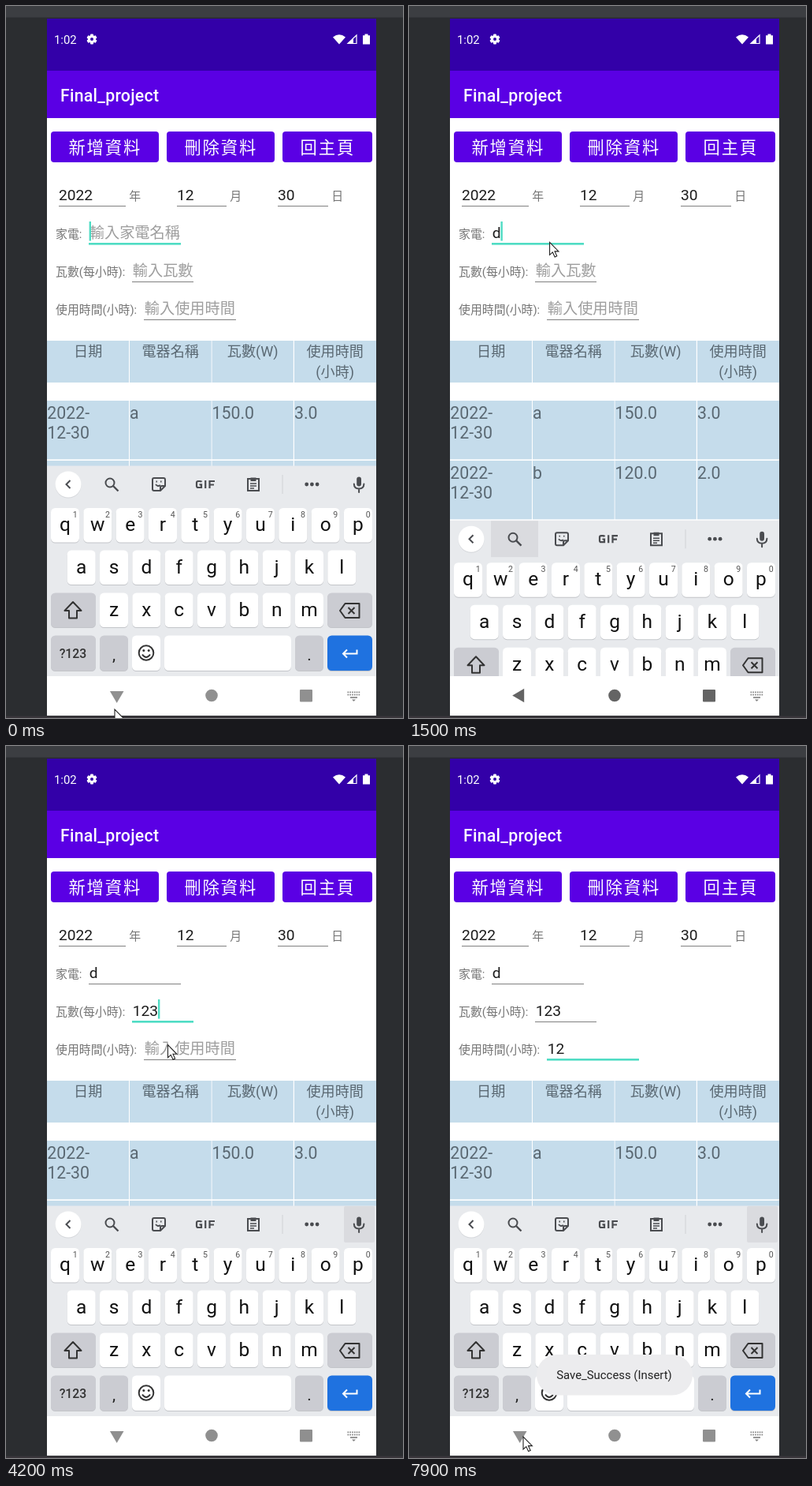
Animation of 504 by 902 pixels, one loop 8000 ms. Source, as an HTML page:

```html
<!DOCTYPE html>
<html lang="zh-Hant">
<head>
<meta charset="utf-8">
<style>
  html, body { margin: 0; width: 100%; height: 100%; overflow: hidden; background: #2b2d30; }
  svg { display: block; width: 504px; height: 902px; }
  text { font-family: Roboto, "Noto Sans CJK TC", "Noto Sans CJK JP", "Noto Sans CJK", sans-serif; white-space: pre; }
</style>
</head>
<body>
<svg id="stage" viewBox="0 0 504 902" xmlns="http://www.w3.org/2000/svg"></svg>
<script>
const LOOP = 8000, STEP = 100;
const PURPLE = '#5a00e4', CELL = '#c5dceb', MUTED = '#5a6872', TEAL = '#4fdcc4', ICON = '#4a4c50';

const rect = (x, y, w, h, fill, extra = '') =>
  `<rect x="${x}" y="${y}" width="${w}" height="${h}" fill="${fill}" ${extra}/>`;
const text = (x, y, size, fill, str, extra = '') =>
  `<text x="${x}" y="${y}" font-size="${size}" fill="${fill}" ${extra}>${str}</text>`;
const line = (d, color, width = 2, extra = '') =>
  `<path d="${d}" fill="none" stroke="${color}" stroke-width="${width}" ${extra}/>`;
const shape = (d, fill, extra = '') => `<path d="${d}" fill="${fill}" ${extra}/>`;
const circle = (x, y, r, fill, extra = '') => `<circle cx="${x}" cy="${y}" r="${r}" fill="${fill}" ${extra}/>`;
const MID = 'text-anchor="middle"';

function header() {
  const teeth = [0, 60, 120].map(a => rect(107, 35.5, 4, 13, '#fff', `rx="1" transform="rotate(${a} 109 42)"`)).join('');
  return rect(52, 16, 418, 66, '#3300a8') + rect(52, 82, 418, 60, PURPLE) +
    text(61, 48, 14.9, '#fff', '1:02') +
    teeth + circle(109, 42, 3.6, 'none', 'stroke="#fff" stroke-width="3"') + circle(109, 42, 2, '#3300a8') +
    shape('M415 39.5Q423 33 431 39.5L423 48.5Z', '#fff') +
    line('M445 37V47.5H434Z', '#fff', 1.2) + shape('M441 41.5V48H433.5Z', '#fff') +
    shape('M453 37.2h2.5v-1.7h4v1.7h2.5V48.5h-9Z', '#fff') +
    text(69, 121, 21.3, '#fff', 'Final_project', 'font-weight="500" letter-spacing=".27"');
}

function buttons() {
  const list = [[57, 137, '新增資料'], [204, 137, '刪除資料'], [351, 114, '回主頁']];
  return list.map(([x, w, label], i) =>
    rect(x, 159, w, 39, PURPLE, `rx="4" id="button${i}"`) +
    text(x + w / 2 - label.length * 11.6 + .3, 187, 21.3, '#fff', label, 'letter-spacing="1.9"')).join('');
}

const fields = [
  { x: 105, w: 117, y: 301, label: '家電:', hint: '輸入家電名稱', typed: [[1500, 'd']] },
  { x: 160, w: 78, y: 349, label: '瓦數(每小時):', hint: '輸入瓦數', typed: [[3500, '1'], [3700, '12'], [3900, '123']] },
  { x: 175, w: 117, y: 397, label: '使用時間(小時):', hint: '輸入使用時間', typed: [[4800, '1'], [5100, '12']] }
];

function form() {
  const dates = [[67, 85, '2022', '年'], [217, 63, '12', '月'], [345, 64, '30', '日']];
  return dates.map(([x, w, value, unit]) =>
    text(x, 246, 19.2, '#1c1c1c', value) + rect(x, 253, w, 1, '#808080') +
    text(x + w + 4.3, 246, 14.9, '#757575', unit)).join('') +
    fields.map((f, i) => text(63, f.y - 7.4, 14.9, '#757575', f.label) +
      text(f.x + .8, f.y - 7.2, 19.2, '#9e9e9e', f.hint, `id="value${i}"`) +
      rect(f.x, f.y, f.w, 1, '#808080', `id="underline${i}"`)).join('') +
    rect(0, 0, 2.4, 24.5, TEAL, 'id="caret"');
}

function table() {
  const columns = [52, 157, 261.5, 366];
  const cells = (y, h) => columns.map(x => rect(x, y, x === 157 ? 103.7 : 104 - (x === 261.5 ? .7 : 0), h, CELL)).join('');
  const titles = ['日期', '電器名稱', '瓦數(W)', '使用時間'];
  let out = cells(424, 53) + titles.map((s, i) => text(104.2 + i * 104.5, 443.5, 18.1, MUTED, s, MID)).join('') +
    text(417.7, 470.3, 18.1, MUTED, '(小時)', MID);
  [['a', '150.0', '3.0'], ['b', '120.0', '2.0'], ['c', '130.0', '1.0']].forEach((row, i) => {
    const y = 500 + i * 76;
    out += cells(y, 74.3) + text(52.3, y + 23, 21.3, MUTED, '2022-') + text(52.3, y + 47.9, 21.3, MUTED, '12-30') +
      row.map((s, c) => text(columns[c + 1], y + 23, 21.3, MUTED, s)).join('');
  });
  return out;
}

function toolbar() {
  const round = 'stroke-linecap="round" stroke-linejoin="round"';
  return rect(104, 583, 60, 46, '#dadbdf', 'id="searchGlow"') + rect(429, 583, 39, 46, '#dadbdf', 'rx="2" id="micGlow"') +
    circle(79, 607, 16.5, '#d4d6da') + circle(79, 606, 16.5, '#fff') + line('M81.5 601L76.5 606L81.5 611', ICON, 2) +
    circle(132, 604, 5.5, 'none', `stroke="${ICON}" stroke-width="2"`) + line('M136 608L142.5 614.5', ICON, 2.4) +
    line('M188 598H200Q202 598 202 600V608L196 614H188Q186 614 186 612V600Q186 598 188 598ZM202 608H198Q196 608 196 610V614', ICON, 2) +
    line('M190 606Q192.5 609.5 196 607M190.5 602.5h1.5M196 602.5h1.5', ICON, 1.8) +
    line('M248.5 602.8Q247.8 602 246 602H244Q242 602 242 604V608Q242 610 244 610H248V606.3H245.5M253.2 601V611M258.5 611V602H265M258.5 606.5H264', ICON, 2.2) +
    line('M307 599H321V614H307Z', ICON, 2) + rect(310.5, 597.5, 7, 4.5, ICON) + line('M310 605h8M310 608h8M310 611h5', ICON, 1.6) +
    rect(350.5, 594, 1, 24, '#cfd1d5') +
    [381.7, 388.4, 395.1].map(x => circle(x, 606, 2.4, ICON)).join('') +
    rect(445.2, 596.5, 5.8, 12, ICON, 'rx="2.9"') + line('M441.8 605.5Q442 611.5 448.1 611.5Q454.2 611.5 454.4 605.5M448.1 611.5V616', ICON, 2, round);
}

function keyboard() {
  const key = (x, y, w, fill = '#fff', h = 43.5) =>
    rect(x, y + 1, w, h, '#c3c5c9', 'rx="5.5"') + rect(x, y, w, h, fill, 'rx="5.5"');
  const GRAY = '#cbccd2';
  let out = rect(52, 582.5, 418, 267, '#e8eaed') + toolbar();
  [['qwertyuiop', 57, 636], ['asdfghjkl', 77.7, 689.5], ['zxcvbnm', 119, 743.5]].forEach(([letters, left, y], row) => {
    [...letters].forEach((c, i) => {
      const x = left + i * 41.33;
      out += key(x, y, 36) + text(x + 18, y + 29, 24.5, '#111', c, MID);
      if (!row) out += text(x + 30.7, 648, 10.6, '#555', (i + 1) % 10, MID);
    });
  });
  out += key(57, 743.5, 57, GRAY) + key(408, 743.5, 57, GRAY) + key(57, 797.5, 57, GRAY, 44.5) +
    key(119, 797.5, 36, GRAY, 44.5) + key(160, 797.5, 36, '#fff', 44.5) + key(201, 797.5, 161, '#fff', 44.5) +
    key(367, 797.5, 36, GRAY, 44.5) + key(408, 797.5, 57, '#1f72e0', 44.5);
  return out + line('M85 755L74.5 766H80V775.5H90V766H95.5Z', '#333', 2, 'stroke-linejoin="round"') +
    line('M430.5 757H448.5V775H430.5L424 766Z', '#333', 2, 'stroke-linejoin="round"') + line('M434.5 762L442.5 770M442.5 762L434.5 770', '#333', 2) +
    text(85, 825.5, 15.8, '#333', '?123', MID + ' font-weight="500"') +
    text(137, 829, 21, '#222', ',', MID) + text(385, 829, 21, '#222', '.', MID) +
    circle(178, 819.5, 9.3, 'none', 'stroke="#333" stroke-width="2"') + circle(174.8, 816.5, 1.5, '#333') + circle(181.2, 816.5, 1.5, '#333') +
    line('M173 821.5Q178 828.5 183 821.5', '#333', 2) +
    line('M445.5 815.5V820.5H428.5M433 815.5L428 820.5L433 825.5', '#fff', 2);
}

function navigation() {
  let dots = '';
  for (let i = 0; i < 12; i++) dots += rect(433.5 + i % 6 * 2.8, 868.5 + (i / 6 | 0) * 3.2, 1.7, 1.7, '#858585');
  return rect(52, 849, 418, 50, '#fff', 'id="navBar"') + `<g id="navIcons">
    <path id="back" d="M-9.5 0L5.5 -8.8V8.8Z"/><circle cx="261" cy="873.5" r="7.8"/>
    <rect x="373" y="866" width="16" height="15.6" rx="1"/></g>
    <g id="switcher">${dots}${rect(437, 875.2, 9, 1.7, '#858585')}${shape('M439 878.5h5l-2.5 2.4Z', '#858585')}</g>`;
}

document.getElementById('stage').innerHTML =
  '<defs><clipPath id="screen"><rect x="52" y="16" width="418" height="833.5"/></clipPath></defs>' +
  rect(0, 0, 504, 902, '#2b2d30') + rect(0, 0, 504, 14.5, '#3c3e42') + rect(0, 899.5, 504, 2.5, '#39363b') +
  rect(52, 142, 418, 757, '#fff') + header() + buttons() + form() + table() +
  `<g clip-path="url(#screen)"><g id="keyboard">${keyboard()}</g></g>` + navigation() +
  `<g id="toast">${rect(162, 771, 198, 51.5, '#ececee', 'rx="25.7"')}${text(260.5, 802, 14.9, '#222', 'Save_Success (Insert)', MID)}</g>` +
  shape('M0 0V16L3.8 12.6L6.6 18.6L9.2 17.4L6.5 11.6H11.4Z', '#fff', 'id="pointer" stroke="#222" stroke-width="1.1"');

const $ = id => document.getElementById(id);
const set = (id, attrs) => { for (const k in attrs) $(id).setAttribute(k, attrs[k]); };

// Eased interpolation through [time, ...values] stops.
function track(stops, t) {
  const next = stops.findIndex(s => s[0] > t);
  if (next < 0) return stops.at(-1).slice(1);
  if (next === 0) return stops[0].slice(1);
  const a = stops[next - 1], b = stops[next];
  const p = (t - a[0]) / (b[0] - a[0]), e = p * p * (3 - 2 * p);
  return a.slice(1).map((v, i) => v + (b[i + 1] - v) * e);
}

const pointerPath = [[0, 138, 891], [200, 139, 874], [400, 140, 870], [900, 174, 309], [1200, 166, 289], [1400, 170, 291],
  [1700, 203, 323], [2400, 207, 338], [3100, 208, 346], [3900, 208, 350], [4300, 205, 384], [4900, 205, 390],
  [5400, 215, 854], [5700, 200, 888], [6100, 185, 870], [6600, 136, 184], [6800, 138, 186], [7000, 198, 620],
  [7300, 148, 862], [7900, 145, 875]];
const keyboardSlide = [[300, 0], [600, 267], [1300, 267], [1600, 0]];
const backTurn = [[300, -90], [700, 0], [1600, 0], [1800, -38], [2000, -90]];
const navGray = [[1600, 100], [1900, 108], [3100, 118], [4300, 144]];
const ripple = [[6700, 0], [6900, 1], [7000, 1], [7300, 0]];
const toastFade = [[7200, 0], [7500, 1]];
const caretResets = [-200, 1100, 1500, 2500, 3500, 3700, 3900, 4300, 4800, 5100];

function render(t) {
  const focus = t < 2500 ? 0 : t < 4300 ? 1 : 2;
  fields.forEach((f, i) => {
    const value = f.typed.filter(s => s[0] <= t).at(-1)?.[1] ?? '';
    const node = $('value' + i), active = i === focus;
    node.textContent = value || f.hint;
    node.setAttribute('fill', value ? '#1c1c1c' : '#9e9e9e');
    set('underline' + i, { fill: active ? TEAL : '#808080', height: active ? 2.6 : 1, y: active ? f.y - 1 : f.y });
    if (active) set('caret', { x: f.x + .6 + (value ? node.getComputedTextLength() : 0), y: f.y - 28 });
  });
  const sinceReset = t - caretResets.filter(r => r <= t).at(-1);
  set('caret', { opacity: sinceReset % 1000 < 500 ? 1 : 0 });

  set('keyboard', { transform: `translate(0 ${track(keyboardSlide, t)[0]})` });
  set('searchGlow', { opacity: t >= 1500 && t < 2100 ? 1 : 0 });
  set('micGlow', { opacity: t >= 2100 ? 1 : 0 });

  const dark = t >= 500 && t < 1500, gray = t < 500 ? 144 : track(navGray, t)[0];
  set('navBar', { fill: dark ? '#000' : '#fff' });
  set('navIcons', { fill: dark ? '#fff' : `rgb(${gray},${gray},${gray})` });
  set('back', { transform: `translate(140.7 873.5) rotate(${track(backTurn, t)[0]})` });
  set('switcher', { opacity: dark ? 0 : 1 });

  const [glow] = track(ripple, t);
  set('button0', { fill: `rgb(${90 + 69 * glow},${88 * glow},${228 + 8 * glow})` });
  set('toast', { opacity: track(toastFade, t)[0] });
  set('pointer', { transform: `translate(${track(pointerPath, t).join(' ')})` });
}

function tick() {
  const t = performance.now() % LOOP;
  render(Math.floor(t / STEP) * STEP);
  requestAnimationFrame(tick);
}
tick();
</script>
</body>
</html>
```
